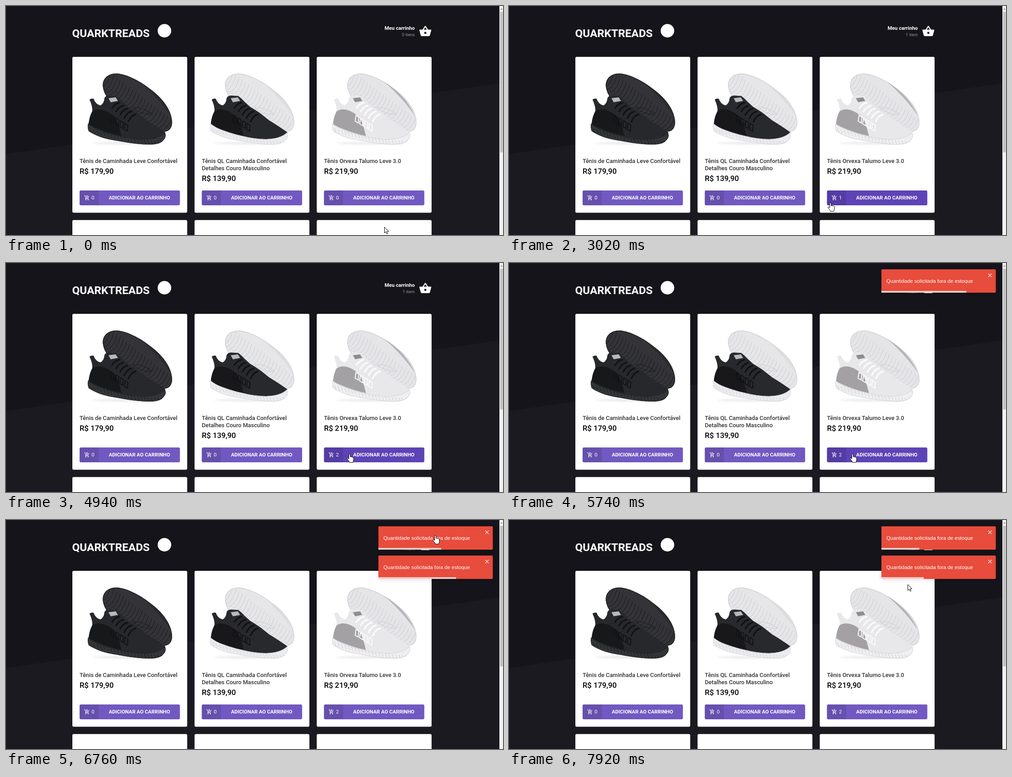
Animation, 1101 px wide and 509 px high, one loop 7.99 s. Source, as an HTML page:

```html
<!DOCTYPE html>
<html lang="pt-BR">
<head>
<meta charset="utf-8">
<title>Loja de tênis</title>
<style>
  html, body { margin: 0; width: 100%; height: 100%; overflow: hidden; background: #15141a; }
  svg { display: block; width: 100%; height: 100%; }
  text { font-family: Roboto, sans-serif; white-space: pre; }
  .brand { font-size: 24.4px; font-weight: 700; fill: #fff; }
  .name { font-size: 12.8px; font-weight: 500; fill: #333; }
  .price { font-size: 16.8px; font-weight: 500; fill: #000; }
  .label { font-size: 11.2px; font-weight: 700; fill: #fff; text-anchor: middle; }
  .count { font-size: 11.2px; fill: #fff; }
  .cart { font-size: 11.2px; font-weight: 700; fill: #fff; text-anchor: end; }
  .items { font-size: 9.6px; fill: #999; text-anchor: end; }
  .msg { font-family: "Liberation Sans", Arial, sans-serif; font-size: 11.4px; fill: #fff; }
  .toast { filter: drop-shadow(0 1px 4px rgba(0, 0, 0, .15)); }
</style>
</head>
<body>
<svg id="stage" viewBox="0 0 1101 509"></svg>
<script>
const LOOP = 7990;
const stage = document.getElementById('stage');

const CART = 'M11 9h2V6h3V4h-3V1h-2v3H8v2h3v3zm-4 9c-1.1 0-1.99.9-1.99 2S5.9 22 7 22s2-.9 2-2-.9-2-2-2zm10 0c-1.1 0-1.99.9-1.99 2s.89 2 1.99 2 2-.9 2-2-.9-2-2-2zm-9.83-3.25l.03-.12.9-1.63h7.45c.75 0 1.41-.41 1.75-1.03l3.86-7.01L19.42 4h-.01l-1.1 2-2.76 5H8.53l-.13-.27L6.16 6l-.95-2-.94-2H1v2h2l3.6 7.59-1.35 2.45c-.16.28-.25.61-.25.96 0 1.1.9 2 2 2h12v-2H7.42c-.13 0-.25-.11-.25-.25z';
const BASKET = 'M17.21 9l-4.38-6.56c-.19-.28-.51-.42-.83-.42-.32 0-.64.14-.83.43L6.79 9H2c-.55 0-1 .45-1 1 0 .09.01.18.04.27l2.54 9.27c.23.84 1 1.46 1.92 1.46h13c.92 0 1.69-.62 1.93-1.46l2.54-9.27L23 10c0-.55-.45-1-1-1h-4.79zM9 9l3-4.4L15 9H9zm3 8c-1.1 0-2-.9-2-2s.9-2 2-2 2 .9 2 2-.9 2-2 2z';
const ARROW = 'M.5 .5V13.5L3.5 10.8L5.6 15.5L7.7 14.6L5.6 10H9.8Z';
const HAND = 'M-1.5 1.8a1.5 1.5 0 0 1 3 0V7C2 5.8 4 6.2 4.2 7.5C5 6.5 6.6 7 6.8 8.2C7.8 7.5 9 8.2 9 9.5V14C9 16 7.8 17 7.8 19.3H0C0 17.5 -3 14.5 -5 11.5C-5.8 10 -4.3 8.8 -3 9.8L-1.5 11.5Z';

const BACK = 'M216 186C210 166 222 150 245 150C273 152 305 172 330 193C352 212 368 236 368 260C367 276 356 281 345 279L280 246L234 213Q219 200 216 186Z';
const RIM = 'M296 168Q345 199 364 244Q340 207 296 168Z';
const UPPER = 'M185 208Q189 205 194 206Q198 218 209 221Q217 217 218 205Q220 199 228 199L244 200Q252 206 258 213L270 224Q282 231 292 238L312 254Q335 268 353 281L345 296L290 298L225 284L183 266Q184 250 190 238Q194 228 185 208Z';
const SOLE = 'M182 261Q194 271 209 276Q230 284 249 288Q280 296 305 296Q338 295 352 281Q357 291 347 300Q340 308 315 308Q285 307 249 300Q222 296 209 291Q191 284 183 278Q180 269 182 261Z';
const HEEL = 'M191 234Q204 226 220 233Q238 240 247 258Q252 272 256 289Q215 280 183 263Q184 247 191 234Z';

const PRODUCTS = [
  { x: 147, name: ['Tênis de Caminhada Leve Confortável'], price: 'R$ 179,90',
    back: '#343438', ridge: '#1f2023', rim: '#2a2a2d', upper: '#232427', mesh: .22, heel: '#17181a', sole: '#343538', edge: '#1d1e20', lace: '#111214', label: '#b9b9bb' },
  { x: 417.7, name: ['Tênis QL Caminhada Confortável', 'Detalhes Couro Masculino'], price: 'R$ 139,90',
    back: '#e6e6e8', ridge: '#d3d3d7', rim: '#dcdcdf', upper: '#242528', mesh: .22, heel: '#18181b', sole: '#ececef', edge: '#d6d6da', lace: '#101113', label: '#b9b9bb' },
  { x: 688.4, name: ['Tênis Orvexa Talumo Leve 3.0'], price: 'R$ 219,90',
    back: '#e5e5e8', ridge: '#d3d3d7', rim: '#b4b2b6', upper: '#ebebee', mesh: .12, heel: '#a4a1a5', sole: '#efeff1', edge: '#d2d2d6', lace: '#fbfbfc', label: '#8f8d91' }
];

const range = n => Array.from({ length: n }, (_, i) => i);

function shoe(p) {
  const ridges = range(24).map(i => `M${208 + i * 7} ${182 + i * 5}q16 -2 24 -${34 - i * .4}`).join('');
  const grooves = range(22).map(i => `M${186 + i * 7.5} ${272 + 28 * Math.sin(i / 14)}l4 9`).join('');
  const laces = range(5).map(i => `M${251 + i * 9} ${215 + i * 6.5}q-10 2 -16 ${12 + i}`).join('');
  const cage = range(4).map(i => `M${234 + i * 10} ${243 + i * 6}l6 4l-1 13l-7 -4z`).join('');
  return `<g>
    <ellipse cx="265" cy="305" rx="75" ry="3" fill="#000" opacity=".08" filter="url(#soft)"/>
    <path d="${BACK}" fill="${p.back}"/>
    <g clip-path="url(#back)" fill="none" stroke="${p.ridge}">
      <path d="${ridges}" stroke-width="1.3"/>
      <path d="${BACK}" stroke-width="3"/>
      <path d="M280 226q18 -3 44 14q-20 4 -44 -14" stroke-width="1.4"/>
    </g>
    <path d="${RIM}" fill="${p.rim}"/>
    <path d="${UPPER}" fill="${p.upper}"/>
    <path d="${UPPER}" fill="url(#mesh)" opacity="${p.mesh}"/>
    <path d="${HEEL}" fill="${p.heel}"/>
    <path d="${cage}" fill="none" stroke="${p.lace}" stroke-width="2"/>
    <path d="${laces}" fill="none" stroke="${p.lace}" stroke-width="3.4" stroke-linecap="round"/>
    <path d="M227 205L243 203L248 211L232 214Z" fill="${p.label}"/>
    <path d="${SOLE}" fill="${p.sole}"/>
    <g clip-path="url(#sole)" fill="none" stroke="${p.edge}">
      <path d="${grooves}" stroke-width="1.2"/>
      <path d="${SOLE}" stroke-width="2"/>
    </g>
  </g>`;
}

function card(p, i) {
  const names = p.name.map((s, k) => `<text class="name" x="16" y="${349 + k * 16}">${s}</text>`).join('');
  return `<g transform="translate(${p.x} 0)">
    <rect y="113" width="254.4" height="346.5" rx="3" fill="#fff"/>
    <rect y="475.7" width="254.4" height="60" rx="3" fill="#fff"/>
    <g transform="translate(-147 0)">${shoe(p)}</g>
    ${names}
    <text class="price" x="16" y="${373 + (p.name.length - 1) * 16}">${p.price}</text>
    <rect id="btn${i}" x="16" y="410" width="222.3" height="33" rx="3" fill="#7159c1"/>
    <path d="M58.5 410V443H19a3 3 0 0 1 -3 -3V413a3 3 0 0 1 3 -3Z" fill="#000" opacity=".1"/>
    <path d="${CART}" transform="translate(26 420) scale(.533)" fill="#fff"/>
    <text class="count" id="count${i}" x="42.6" y="430.4">0</text>
    <text class="label" x="148.6" y="430.4">ADICIONAR AO CARRINHO</text>
  </g>`;
}

const toast = (id, y) => `<g class="toast" id="${id}" display="none">
  <rect x="825" y="${y}" width="253.4" height="52" rx="2" fill="#e74c3c"/>
  <text class="msg" x="836" y="${y + 30}">Quantidade solicitada fora de estoque</text>
  <path d="M1061.7 ${y + 9.6}l7.4 7.4m0 -7.4l-7.4 7.4" stroke="#fff" stroke-width="1.5" opacity=".75"/>
  <rect id="${id}bar" x="825" y="${y + 48}" width="0" height="4" fill="#fff" opacity=".7"/>
</g>`;

stage.innerHTML = `
  <defs>
    <clipPath id="back"><path d="${BACK}"/></clipPath>
    <clipPath id="sole"><path d="${SOLE}"/></clipPath>
    <filter id="soft" y="-200%" height="500%"><feGaussianBlur stdDeviation="2"/></filter>
    <pattern id="mesh" width="4" height="4" patternUnits="userSpaceOnUse" patternTransform="rotate(30)">
      <circle cx="1" cy="1" r=".8" fill="#77787c"/><circle cx="3" cy="3" r=".8" fill="#77787c"/>
    </pattern>
  </defs>
  <rect width="1101" height="509" fill="#15141a"/>
  <path d="M0 329L1093 172V509H0Z" fill="#1b1a20"/>
  <text class="brand" x="146.5" y="68.7">QUARKTREADS</text>
  <circle cx="351" cy="55" r="15" fill="#fff"/>
  <text class="cart" x="905.5" y="53">Meu carrinho</text>
  <text class="items" id="items" x="905.5" y="66.5">0 itens</text>
  <path d="${BASKET}" transform="translate(914.5 41.7) scale(1.2)" fill="#fff"/>
  ${PRODUCTS.map(card).join('')}
  ${toast('first', 14)}${toast('second', 79)}
  <rect x="1093" width="8" height="509" fill="#f1f1f1"/>
  <rect x="1094.5" y="13" width="6" height="312.5" fill="#c1c1c1"/>
  <path d="M1095 8l2.5 -3l2.5 3z" fill="#8a8a8a"/>
  <path id="cursor" fill="#fff" stroke="#000" stroke-linejoin="round"/>
  <circle id="click" r="9.8" fill="#ff0" opacity=".47"/>`;

const el = {};
['btn2', 'count2', 'items', 'first', 'firstbar', 'second', 'secondbar', 'cursor', 'click']
  .forEach(id => el[id] = document.getElementById(id));

// Piecewise linear track of [time, ...values]
function track(keys, t) {
  const n = keys.findIndex(k => k[0] > t);
  if (n < 0) return keys[keys.length - 1].slice(1);
  if (n === 0) return keys[0].slice(1);
  const a = keys[n - 1], b = keys[n], p = (t - a[0]) / (b[0] - a[0]);
  return a.slice(1).map((v, i) => v + (b[i + 1] - v) * p);
}

const POINTER = [
  [0, 838, 491], [70, 836, 487], [400, 816, 439], [530, 816, 439], [930, 803, 420], [1130, 802, 418],
  [2800, 802, 418], [3020, 712, 437], [3150, 702, 439], [3350, 702, 437], [3590, 723, 426],
  [3900, 740, 418], [4260, 761, 424], [6050, 761, 424], [6120, 763, 421], [6235, 850, 131],
  [6320, 880, 65], [6460, 884, 56], [6760, 951, 34], [7200, 949, 27], [7310, 948, 21],
  [7380, 946, 11], [7460, 940, 30], [7850, 883, 143]
];
const HOVER = [[240, 0], [400, 1], [3120, 1], [3250, 0], [3380, 0], [3560, 1], [6130, 1], [6330, 0]];
const BAR1 = [[5670, 194], [6120, 156], [6320, 139], [7270, 139], [7920, 84], [7990, 78]];
const BAR2 = [[5696, 253.4], [6120, 219], [6235, 209], [6320, 209], [6760, 172], [7150, 139], [7380, 139], [7920, 94], [7990, 88]];
const CLICKS = [[1660, 1800], [4470, 4600], [4800, 4940], [5530, 5670]];
const BOUNCE = [[0, 2400], [.6, -20], [.75, 8], [.9, -4], [1, 0]];

function bounceIn(p) {
  if (p >= 1) return 0;
  const n = BOUNCE.findIndex(k => k[0] > p);
  const [a, from] = BOUNCE[n - 1], [b, to] = BOUNCE[n];
  return to + (from - to) * (1 - (p - a) / (b - a)) ** 3;
}

const mix = (a, b, p) => `rgb(${a.map((v, i) => Math.round(v + (b[i] - v) * p))})`;
const inside = (x, y, l, t, r, b) => x >= l && x <= r && y >= t && y <= b;
const show = (node, on) => node.setAttribute('display', on ? 'inline' : 'none');

function draw(t) {
  const [x, y] = track(POINTER, t).map(Math.round);
  const up1 = t >= 5670, up2 = t >= 5696;
  const hand = inside(x, y, 705, 410, 927, 443)
    || up1 && inside(x, y, 825, 14, 1078, 66)
    || up2 && inside(x, y, 825, 79, 1078, 131);
  el.cursor.setAttribute('d', hand ? HAND : ARROW);
  el.cursor.setAttribute('transform', `translate(${x} ${y})`);

  show(el.click, CLICKS.some(([a, b]) => t >= a && t < b));
  el.click.setAttribute('cx', x);
  el.click.setAttribute('cy', y);

  el.btn2.setAttribute('fill', mix([113, 89, 193], [94, 67, 182], track(HOVER, t)[0]));
  el.count2.textContent = t < 2270 ? 0 : t < 4670 ? 1 : 2;
  el.items.textContent = t < 2270 ? '0 itens' : '1 item';

  show(el.first, up1);
  show(el.second, up2);
  el.firstbar.setAttribute('width', track(BAR1, t)[0]);
  el.secondbar.setAttribute('width', track(BAR2, t)[0]);
  if (up2) el.second.setAttribute('transform', `translate(${bounceIn((t - 5696) / 700)} 0)`);
}

const start = performance.now();
function tick() {
  draw((performance.now() - start) % LOOP);
  requestAnimationFrame(tick);
}
tick();
</script>
</body>
</html>
```
